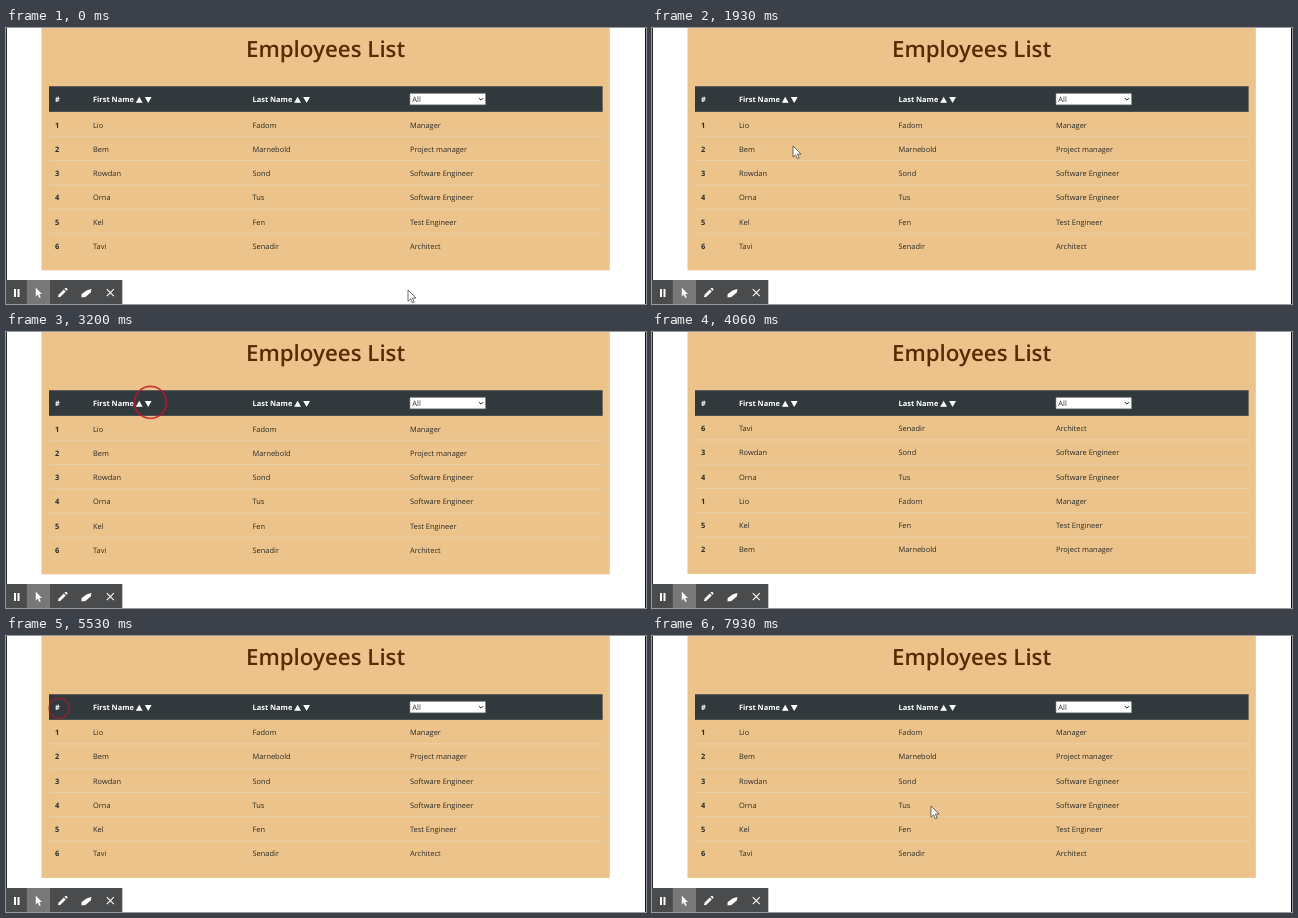
An HTML page for the animation above (8000 ms loop, 640 by 276 pixels).

```html
<!DOCTYPE html>
<html lang="en">
<head>
<meta charset="utf-8">
<title>Employees List</title>
<style>
  html, body { margin: 0; width: 100%; height: 100%; overflow: hidden; background: #fff; }
  svg { display: block; width: 100vw; height: 100vh; }
  text { font: 7.45px "Open Sans", "Noto Sans", sans-serif; fill: #292a28; text-rendering: geometricPrecision; }
  .bold { font-weight: 700; }
  .head { font-weight: 700; fill: #fff; }
  .title { font-size: 22.3px; font-weight: 600; fill: #5b2904; }
</style>
</head>
<body>
<svg viewBox="0 0 640 276">
  <rect width="640" height="276" fill="#fff"/>
  <path d="M.4 0V276M639.5 0V276" stroke="#111"/>
  <rect id="panel" x="35.5" width="568.3" height="242.3" fill="#ecc38a"/>
  <text class="title" x="319.6" y="28.8" text-anchor="middle">Employees List</text>

  <g id="body"></g>

  <rect x="43" y="58.4" width="553.6" height="25.4" fill="#32393d"/>
  <path d="M43 58.7H596.6M43 83.5H596.6" stroke="#454d53" stroke-width=".6"/>
  <text class="head" x="49" y="74.3">#</text>
  <text class="head" x="87" y="74.3">First Name</text>
  <text class="head" x="246.5" y="74.3">Last Name</text>
  <path id="arrows" fill="#fff"/>
  <rect x="404" y="65.4" width="75.5" height="11.4" rx=".6" fill="#fff" stroke="#8a8d8f" stroke-width=".6"/>
  <text x="406.3" y="74.2">All</text>
  <path d="M472.9 70.1l2.1 2.1 2.1-2.1" fill="none" stroke="#222"/>

  <g id="toolbar" fill="#fff">
    <rect y="252" width="116.3" height="24" fill="#4a4b4c"/>
    <rect x="20.8" y="252" width="23.2" height="24" fill="#787878"/>
    <path d="M8 261h2v8h-2zM11.5 261h2v8h-2z"/>
    <path d="M29.8 259.8v8.6l2-1.8 1.5 3.3 1.4-.6-1.5-3.3h2.7z"/>
    <path d="M52 269.2l.5-2.4 5.3-5.3 2 2-5.3 5.3zM58.5 260.8l.9-.9q.5-.4 1 0l1 1q.4.5 0 1l-.9.9z"/>
    <path d="M75.6 266l5.4-3.7 4.5-1.3-.8 3.6-5.2 4.3-4 .6z"/>
    <path d="M100.8 261.2l7 7M107.8 261.2l-7 7" stroke="#fff" stroke-width="1.1"/>
  </g>

  <circle id="ring" fill="none" stroke="#c4142c" stroke-width="1.7"/>
  <path id="cursor" d="M0 0V11.2L2.6 8.8 4.4 12.8 6.2 12 4.4 8.1H8z" fill="#fff" stroke="#333" stroke-width=".7" stroke-linejoin="round"/>
</svg>
<script>
const LOOP = 8000, TICK = 200 / 3;
const HEADER_BOTTOM = 84, ROW_HEIGHT = 24.28;
const $ = id => document.getElementById(id);

const employees = [
  [1, 'Lio', 'Fadom', 'Manager'],
  [2, 'Bem', 'Marnebold', 'Project manager'],
  [3, 'Rowdan', 'Sond', 'Software Engineer'],
  [4, 'Orna', 'Tus', 'Software Engineer'],
  [5, 'Kel', 'Fen', 'Test Engineer'],
  [6, 'Tavi', 'Senadir', 'Architect'],
];
const byNumber = employees;
const byNameDescending = [...employees].sort((a, b) => b[1].localeCompare(a[1]));
const columns = [49, 87, 246.5, 404];

// Pointer stops: time in ms, x, y. It is not drawn over the header.
const pointerPath = [
  [0, 402, 262], [533, 402, 262], [800, 410, 247], [1333, 410, 247],
  [1667, 145, 129], [1867, 145, 129], [1933, 141, 118], [2467, 143, 88],
  [2600, 144, 72], [4000, 145, 72], [4067, 145, 105], [4667, 90, 100],
  [4800, 90, 100], [5067, 53, 72], [6133, 53, 72], [6333, 160, 140],
  [7067, 160, 140], [7333, 278, 182.5], [7533, 278, 182.5], [7933, 279, 170],
];
const clicks = [
  { x: 144.5, y: 70.3, down: 3067, up: 3333 },
  { x: 53, y: 72.3, down: 5200, up: 5533 },
];

$('arrows').setAttribute('d', [133.2, 291.6].map(x =>
  `M${x - 3.4} 74.7h6.8l-3.4-5.9zM${x + 5.6} 69h6.8l-3.4 5.9z`).join(''));

function renderRows(rows) {
  $('body').innerHTML = rows.map((row, i) => {
    const top = HEADER_BOTTOM + i * ROW_HEIGHT;
    const cells = row.map((value, c) =>
      `<text class="${c ? '' : 'bold'}" x="${columns[c]}" y="${top + 15.5}">${value}</text>`).join('');
    const line = i ? `<path d="M43 ${top}H596.6" stroke="#e6d3b5" stroke-width=".8"/>` : '';
    return line + cells;
  }).join('');
}

function pointerAt(t) {
  const next = pointerPath.findIndex(stop => stop[0] > t);
  if (next < 0) return pointerPath.at(-1).slice(1);
  const [t0, x0, y0] = pointerPath[next - 1], [t1, x1, y1] = pointerPath[next];
  const k = (t - t0) / (t1 - t0);
  return [x0 + (x1 - x0) * k, y0 + (y1 - y0) * k];
}

function drawRing(t) {
  const click = clicks.find(c => t > c.down - 5 && t < c.up + TICK - 5);
  $('ring').style.display = click ? '' : 'none';
  if (!click) return;
  const released = t > click.up - 5;
  const radius = released ? 10 : Math.min(16, 6 + (t - click.down) / TICK * 5);
  $('ring').setAttribute('cx', click.x);
  $('ring').setAttribute('cy', click.y);
  $('ring').setAttribute('r', radius);
  $('ring').setAttribute('opacity', released ? 0.5 : 0.8);
}

let shownRows;
function draw(time) {
  const t = Math.floor((time % LOOP + 4) / TICK) * TICK;
  const [firstSort, secondSort] = clicks.map(c => c.up - 5);

  const rows = t > firstSort && t < secondSort ? byNameDescending : byNumber;
  if (rows !== shownRows) renderRows(shownRows = rows);
  const shift = t > firstSort ? -0.4 : 0;
  $('body').setAttribute('transform', `translate(0 ${shift})`);
  $('panel').setAttribute('height', 242.3 + shift);

  const [x, y] = pointerAt(t);
  $('cursor').setAttribute('transform', `translate(${x} ${y})`);
  $('cursor').style.display = y < HEADER_BOTTOM ? 'none' : '';
  drawRing(t);
}

const start = performance.now();
function frame() {
  draw(performance.now() - start);
  requestAnimationFrame(frame);
}
frame();
</script>
</body>
</html>
```
